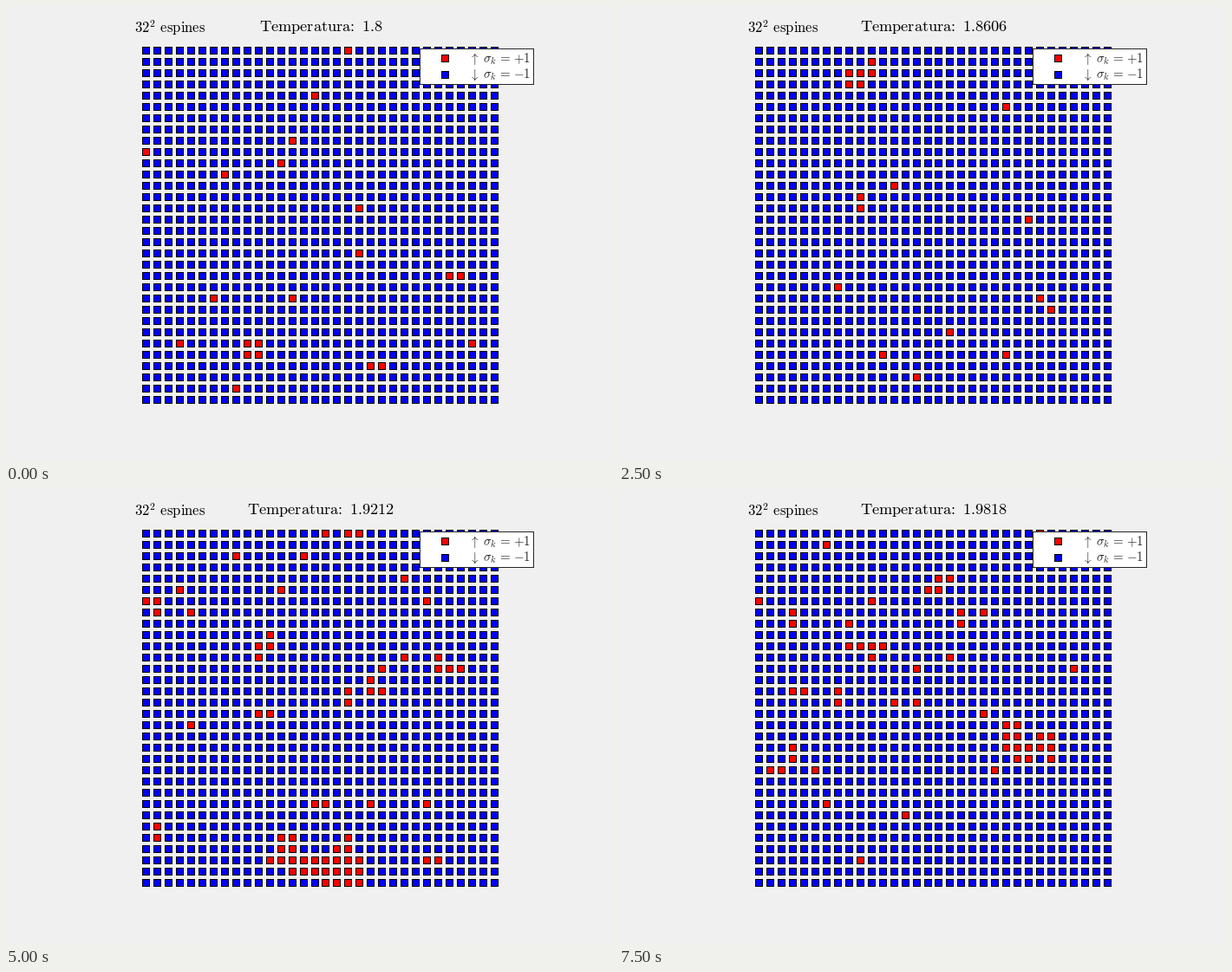
Write a matplotlib script that moves like this. It is 700 px wide and 525 px high and loops after 8000 ms.

```python
import numpy as np
import matplotlib.pyplot as plt
from matplotlib.animation import FuncAnimation
from matplotlib.collections import PolyCollection

W, H, DPI = 700, 525, 100
N = 32                      # spins per side
FRAMES, STEP_MS = 16, 500
SWEEPS = 40                 # Monte Carlo sweeps between frames
T0, DT = 1.8, 1.2 / 99
RED, BLUE, GRAY, INK = "#ff0000", "#0000ff", "#f0f0f0", "#262626"

plt.rcParams["mathtext.fontset"] = "cm"

# spins pointing up at the start, as (column, row)
START_UP = [
    (18, 0), (15, 4), (13, 8), (0, 9), (12, 10), (7, 11), (19, 14),
    (19, 18), (27, 20), (28, 20), (6, 22), (13, 22), (3, 26), (9, 26),
    (10, 26), (29, 26), (9, 27), (10, 27), (20, 28), (21, 28), (8, 30),
]


def temperature(k):
    return T0 + DT * k


def sweep(spins, temp, rng):
    """One Metropolis sweep of the periodic lattice, checkerboard order."""
    parity = np.indices(spins.shape).sum(axis=0) % 2
    for color in (0, 1):
        near = sum(np.roll(spins, s, axis=a) for s in (1, -1) for a in (0, 1))
        cost = 2 * spins * near
        flip = (parity == color) & (rng.random(spins.shape) < np.exp(-cost / temp))
        spins[flip] *= -1


def simulate():
    rng = np.random.default_rng(32)
    spins = -np.ones((N, N), dtype=int)
    for col, row in START_UP:
        spins[row, col] = 1
    states = [spins.copy()]
    for k in range(1, FRAMES):
        for _ in range(SWEEPS):
            sweep(spins, temperature(k), rng)
        states.append(spins.copy())
    return states


def box(x0, y0, x1, y1):
    return [(x0, y0), (x1, y0), (x1, y1), (x0, y1)]


def add_boxes(boxes, color, z):
    polys = PolyCollection(boxes, facecolors=color, edgecolors="none",
                           linewidths=0, antialiaseds=False, zorder=z)
    ax.add_collection(polys)
    return polys


def add_markers(centers, color, z):
    """Squares of 7 px with a black outline of 1 px."""
    add_boxes([box(x - 4, y - 4, x + 5, y + 5) for x, y in centers], "black", z)
    return add_boxes([box(x - 3, y - 3, x + 4, y + 4) for x, y in centers],
                     color, z + 0.1)


def label(x, y, text, px, color="black", ha="left"):
    return ax.text(x, y, f"${text}$", fontsize=px * 72 / DPI, color=color,
                   ha=ha, va="baseline", zorder=6)


def title_text(k):
    return rf"\text{{Temperatura:}}\hspace{{0.506}}\text{{{temperature(k):.5g}}}"


fig = plt.figure(figsize=(W / DPI, H / DPI), dpi=DPI, facecolor=GRAY)
ax = fig.add_axes([0, 0, 1, 1])
ax.set_xlim(0, W)
ax.set_ylim(H, 0)
ax.axis("off")

centers = [(round(161.12 + 12.96 * i), 51 + 13 * j)
           for j in range(N) for i in range(N)]
lattice = add_markers(centers, BLUE, 1)

label(148, 31, r"\text{32}^{2}\hspace{0.38}\text{espines}", 16.67)
title = label(363, 29, title_text(0), 18.33, ha="center")

# legend
add_boxes([box(477, 49, 609, 91)], INK, 3)
add_boxes([box(478, 50, 608, 90)], "white", 3.5)
for y, base, color, arrow, sign in ((60, 65, RED, r"\uparrow", "+"),
                                    (79, 83, BLUE, r"\downarrow", "-")):
    add_markers([(506, y)], color, 4)
    label(540, base, arrow, 15, INK, "center")
    label(549.5, base,
          rf"\sigma_k\hspace{{0.12}}=\hspace{{0.12}}{{{sign}}}1", 15, INK)

states = simulate()


def draw(k):
    lattice.set_facecolor([RED if s > 0 else BLUE for s in states[k].ravel()])
    title.set_text(f"${title_text(k)}$")
    return lattice, title


anim = FuncAnimation(fig, draw, frames=FRAMES, interval=STEP_MS,
                     init_func=lambda: draw(0), repeat=True, repeat_delay=0)
plt.show()
```
